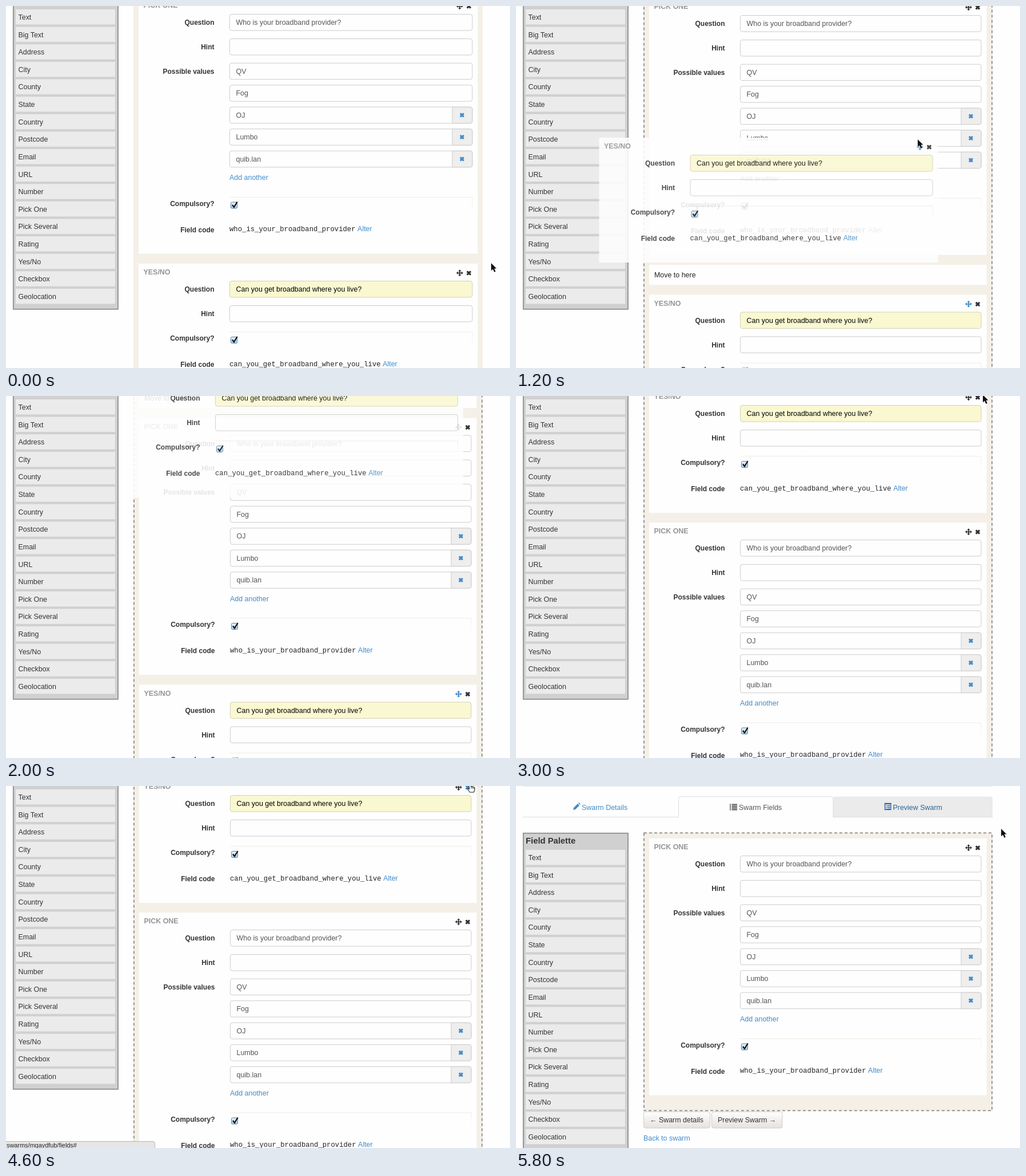
These frames come from a looping animation (882x635 px, 6800 ms). An HTML page:

```html
<!DOCTYPE html>
<html lang="en">
<head>
<meta charset="utf-8">
<title>Form field editor</title>
<style>
html, body { margin: 0; width: 100%; height: 100%; overflow: hidden; background: #fefefe; }
svg { display: block; width: 882px; height: 635px; font: 12.45px "Liberation Sans", Arial, sans-serif; }
.bold { font-weight: bold; }
.label { font-weight: bold; font-size: 12px; text-anchor: end; }
.code { font: 12.25px "Liberation Mono", "Courier New", monospace; }
</style>
</head>
<body>
<svg id="stage" viewBox="0 0 882 635" xmlns="http://www.w3.org/2000/svg"></svg>
<script>
const LOOP = 6800, STEP = 200;
const BLUE = '#428bca', INK = '#333', PAPER = '#fefefe', BEIGE = '#f5f0e7';
const PALETTE = ['Text', 'Big Text', 'Address', 'City', 'County', 'State', 'Country', 'Postcode', 'Email',
  'URL', 'Number', 'Pick One', 'Pick Several', 'Rating', 'Yes/No', 'Checkbox', 'Geolocation'];
const PROVIDERS = ['QV', 'Fog', 'OJ', 'Lumbo', 'quib.lan'];
const LIST_TOP = 92, GAP = 17.5, SLOT = 35, PICK_H = 450.5, YESNO_H = 219, SCROLL = 106;

// Tracks: [time, x, y]
const CURSOR = [[0, 849, 451], [200, 838, 460], [400, 800, 465], [600, 793, 466], [800, 780, 423],
  [1000, 742, 333], [1200, 703, 234], [1400, 722, 103], [1600, 738, -13], [1800, 755, -32],
  [2600, 790, -30], [3000, 817, -2], [3400, 826, 4], [4000, 812, 1], [5400, 812, 1], [5600, 812, 1], [5800, 849, 75]];
const DRAG = [[800, 222, 420], [1000, 184, 330], [1200, 145.5, 231], [1400, 163, 100],
  [1600, 180.5, -25.5], [1800, 196, -37], [2000, 207, -41], [2200, 212, -42]];

function along(track, t) {
  const i = track.findIndex(k => k[0] > t);
  if (i < 0) return track[track.length - 1].slice(1);
  if (i === 0) return track[0].slice(1);
  const [t0, x0, y0] = track[i - 1], [t1, x1, y1] = track[i], u = (t - t0) / (t1 - t0);
  return [x0 + (x1 - x0) * u, y0 + (y1 - y0) * u];
}

const text = (x, y, s, fill = INK, cls = '') => `<text x="${x}" y="${y}" fill="${fill}" class="${cls}">${s}</text>`;
const rect = (x, y, w, h, fill, more = '') => `<rect x="${x}" y="${y}" width="${w}" height="${h}" fill="${fill}" ${more}/>`;
const path = (d, fill, more = '') => `<path d="${d}" fill="${fill}" ${more}/>`;
const group = (x, y, body, more = '') => `<g transform="translate(${x} ${y})" ${more}>${body}</g>`;

const cross = (x, y, color, r = 3.2) =>
  path(`M${x - r} ${y - r}l${2 * r} ${2 * r}m0 ${-2 * r}l${-2 * r} ${2 * r}`, 'none', `stroke="${color}" stroke-width="3.1"`);

const mover = (x, y, color) => group(x, y, path(
  'M0-6L2.7-3H.9V-.9H3V-2.7L6 0 3 2.7V.9H.9V3H2.7L0 6-2.7 3H-.9V.9H-3V2.7L-6 0-3-2.7V-.9H-.9V-3H-2.7Z', color));

function input(x, y, w, value = '', yellow = false) {
  return rect(x + .5, y + .5, w - 1, 28.5, yellow ? '#faf8d1' : PAPER,
    `rx="3.5" stroke="${yellow ? '#d2d0b4' : '#ccc'}"`) +
    text(x + 11.5, y + 19, value, yellow ? '#000' : '#555');
}

function removable(x, y, w, value) {
  const right = x + w - .5, left = right - 35;
  return input(x, y, w, value) +
    path(`M${left} ${y + .5}H${right - 3.5}q3.5 0 3.5 3.5v21.5q0 3.5-3.5 3.5H${left}Z`, '#eee', 'stroke="#ccc"') +
    cross(left + 17, y + 14.7, BLUE, 3);
}

const checkbox = (x, y) => rect(x + .5, y + .5, 11, 11, 'url(#tick)', 'rx="2" stroke="#6084a5"') +
  path(`M${x + 3} ${y + 5.5}l3 3.8L${x + 11.7} ${y}`, 'none', 'stroke="#111" stroke-width="2.2"');

// One field editor; its lower rows follow the list of values when there is one.
function panel({ x, y, w, kind, question, code, values, yellow, moveHot, closeHot, opacity = 1 }) {
  const inX = 159, inW = w - 168, low = values ? 231.5 : 0;
  const label = (ly, s) => text(132.5, ly, s, INK, 'label');
  let out = rect(0, 0, w, values ? PICK_H : YESNO_H, PAPER) +
    text(8.5, 19, kind, '#959595', 'bold') +
    mover(w - 31.5, 16.3, moveHot ? BLUE : INK) + cross(w - 15.5, 16.5, closeHot ? BLUE : INK) +
    label(49, 'Question') + input(inX, 30, inW, question, yellow) +
    label(92, 'Hint') + input(inX, 73, inW);
  if (values) {
    out += label(134.7, 'Possible values');
    values.forEach((v, i) => out += (i < 2 ? input : removable)(inX, 115.7 + 38.5 * i, inW, v));
    out += text(inX, 321, 'Add another', BLUE);
  }
  out += path(`M${inX} ${119.8 + low}h${inW - .5}v26`, 'none', 'stroke="url(#edge)"') +
    label(135 + low, 'Compulsory?') + checkbox(inX + 2, 128 + low) +
    label(181.3 + low, 'Field code') + text(inX, 179.8 + low, code, '#222', 'code') +
    text(inX + code.length * 7.35 + 3.6, 179.8 + low, 'Alter', BLUE);
  return group(x, y, out, `opacity="${opacity}"`);
}

const pickOne = o => panel({ kind: 'PICK ONE', question: 'Who is your broadband provider?',
  code: 'who_is_your_broadband_provider', values: PROVIDERS, ...o });
const yesNo = o => panel({ kind: 'YES/NO', question: 'Can you get broadband where you live?',
  code: 'can_you_get_broadband_where_you_live', yellow: true, ...o });

function palette() {
  return rect(12.8, 82.8, 183.2, 555, '#d0d0d0', 'stroke="#8e9091" stroke-width="1.8"') +
    `<text x="17" y="101" class="bold" style="font-size:14.8px" fill="#333">Field Palette</text>` +
    PALETTE.map((name, i) => {
      const y = 112 + 30.62 * i;
      return rect(17, y, 174, 26.4, '#ebebeb') + text(21.5, y + 18, name);
    }).join('');
}

function tabs() {
  const lines = [0, 1, 2, 3].map(i => 31.5 + i * 3);
  const line = 'stroke="#ddd"';
  return path('M12 .5H834', 'none', 'stroke="#e8e8e8"') +
    path('M555 54V22.5q0-4 4-4H830q4 0 4 4V54Z', '#ebebeb') +
    path('M12 54.5H284.5V22.5q0-4 4-4H551q4 0 4 4V54.5H834', 'none', line) +
    path('M100 42l1-4 7-7 3 3-7 7ZM109 30l1.3-1 2.5 2.5-1 1.3Z', BLUE) +
    text(115, 41.5, 'Swarm Details', BLUE) +
    lines.map(y => rect(374, y, 2, 2, '#555') + rect(377.5, y, 9.5, 2, '#555')).join('') +
    text(390, 41.5, 'Swarm Fields', '#555') +
    rect(645.5, 30.5, 10.5, 11, 'none', 'stroke="#2a6496" stroke-width="1.3"') +
    rect(645, 30, 11.5, 2, '#2a6496') +
    lines.slice(1).map(y => rect(647, y - .8, 1.5, 1.4, '#2a6496') + rect(649.5, y - .8, 5.5, 1.4, '#2a6496')).join('') +
    text(659.5, 41.5, 'Preview Swarm', '#2a6496');
}

const button = (x, w, s) => rect(x + .5, 571.5, w - 1, 28.5, 'url(#button)', 'rx="3.5" stroke="#ccc"') +
  text(x + 11, 589.7, s);

const footer = () => button(223, 117, '← Swarm details') + button(342, 124.5, 'Preview Swarm →') +
  text(223, 622, 'Back to swarm', BLUE);

const slot = y => rect(233, y, 590.5, SLOT, PAPER) + text(242, y + 22, 'Move to here', '#222');

const arrow = (x, y) => group(x, y, path('M0 0V13.3L3.1 10.5 5.4 15.8 7.8 14.8 5.6 9.6H9.5Z', '#111',
  'stroke="#fff" stroke-width="1.2" paint-order="stroke"'));
const hand = (x, y) => group(x, y, path(
  'M-2-3Q-.3-4.5.8-2.5L2 .5Q3.3-.8 4.5.6 5.8-.3 6.6 1.3 8.2.8 8.2 3V6L6.5 10H-.2L-4.3 4.5Q-4.4 2.7-2.6 3.6L-1.2 4.7Z',
  '#fff', 'stroke="#222" stroke-width="1.1" stroke-linejoin="round"') +
  path('M2 .8V4M4.6 1V4M6.7 1.6V4', 'none', 'stroke="#222" stroke-width=".8"'));

const statusBar = () => path('M-1 636V623.5H257q3.5 0 3.5 3.5V636Z', '#e6e6e6', 'stroke="#b5b5b5"') +
  `<text x="1" y="634" style="font-size:10.9px" fill="#222">swarms/mqaydfub/fields#</text>`;

const DEFS = `<defs>
<linearGradient id="tick" x2="0" y2="1"><stop stop-color="#e8f3fc"/><stop offset="1" stop-color="#a3cdf0"/></linearGradient>
<linearGradient id="edge" x2="0" y2="1"><stop stop-color="#f0ece1"/><stop offset="1" stop-color="#f0ece1" stop-opacity="0"/></linearGradient>
<linearGradient id="button" x2="0" y2="1"><stop stop-color="#fefefe"/><stop offset="1" stop-color="#e6e2dd"/></linearGradient>
</defs>`;

function fields(t) {
  const dashed = t >= 800, dragging = dashed && t < 2600, done = t >= 5400;
  const top = dashed ? LIST_TOP : LIST_TOP - 2;
  const box = dashed ? { x: 233, w: 590.5 } : { x: 232, w: 593.5 };
  const hot = t >= 4200 && t < 5400;
  let out = rect(223, 81.5, 611, done ? 489 : 900, BEIGE);
  if (dashed) out += rect(224, 82.4, 609, done ? 487 : 900, 'none',
    'stroke="#8c8c8c" stroke-width="1.8" stroke-dasharray="5 4"');
  if (done) return out + pickOne({ ...box, y: top });
  if (t >= 2600) {
    const fade = t >= 5200 ? .3 : t >= 5000 ? .7 : 1;
    return out + yesNo({ ...box, y: top, closeHot: hot, opacity: fade }) +
      pickOne({ ...box, y: top + YESNO_H + GAP - .5 });
  }
  const slotFirst = dragging && t >= 1800;
  const pickY = top + (slotFirst ? SLOT + GAP : 0);
  let next = pickY + PICK_H + GAP;
  out += pickOne({ ...box, y: pickY });
  if (slotFirst) out += slot(top);
  else if (dragging) {
    out += slot(next);
    next += SLOT + GAP;
  }
  return out + yesNo({ ...box, y: next, moveHot: t >= 600 });
}

function scene(t) {
  const done = t >= 5400;
  const overLink = t === 600 || (t >= 4200 && t < 5400);
  const [cx, cy] = along(CURSOR, t);
  let out = DEFS + group(0, done ? 0 : -SCROLL, palette() + fields(t) + (done ? tabs() + footer() : ''));
  if (t >= 800 && t < 2600) {
    const [x, y] = along(DRAG, t);
    out += yesNo({ x, y, w: 593, moveHot: true, opacity: .88 });
  }
  if (overLink) out += statusBar();
  return out + (overLink ? hand : arrow)(cx, cy);
}

const stage = document.getElementById('stage');
let shown = -1;
function draw() {
  const t = Math.floor(performance.now() % LOOP / STEP) * STEP;
  if (t !== shown) stage.innerHTML = scene(shown = t);
  requestAnimationFrame(draw);
}
draw();
</script>
</body>
</html>
```
